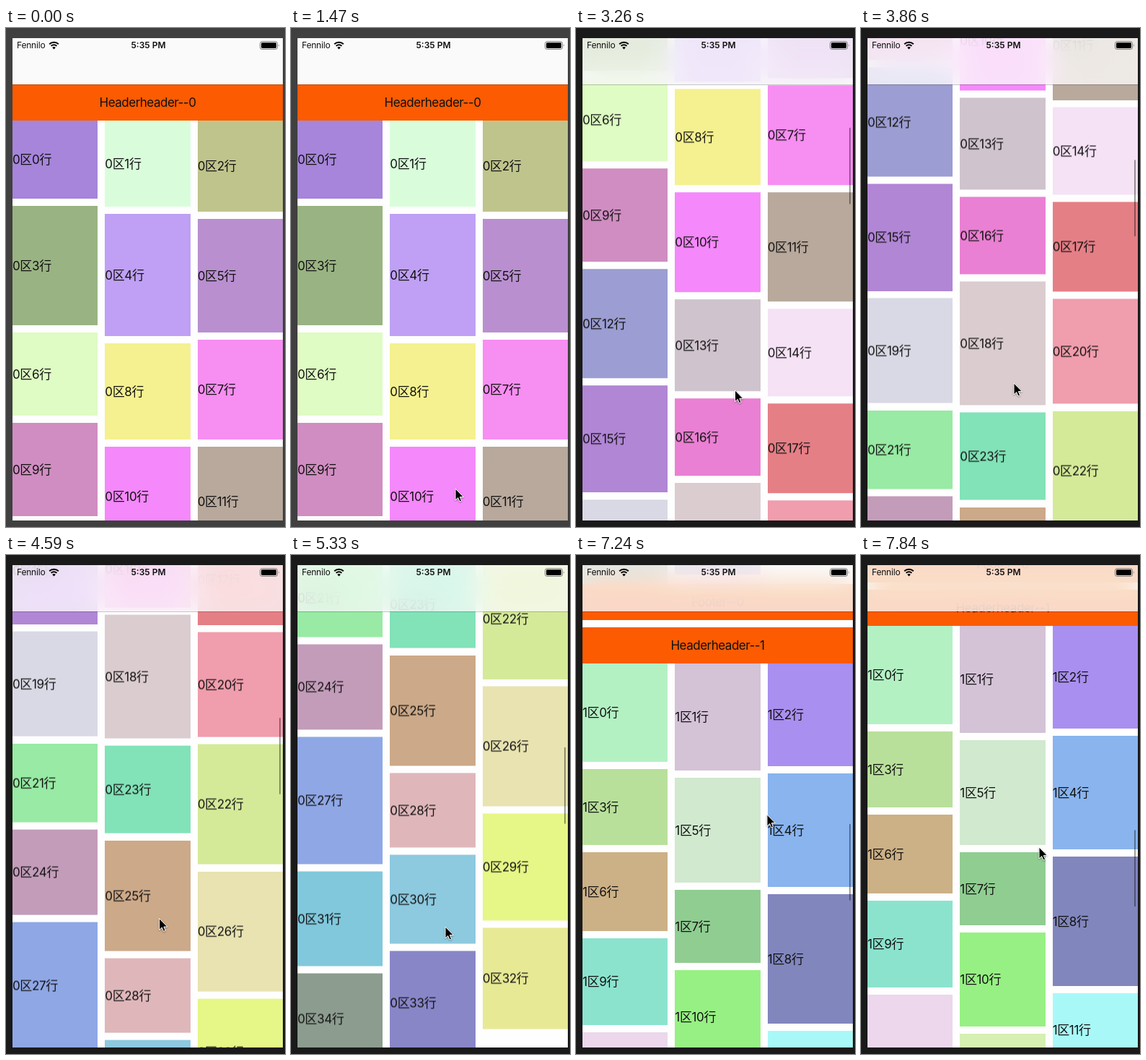
These frames come from a looping animation (387x690 px, 7990 ms). An HTML page:

```html
<!DOCTYPE html>
<html lang="zh-CN">
<head>
<meta charset="utf-8">
<title>Waterfall layout</title>
<style>
  html, body { margin: 0; width: 100%; height: 100%; overflow: hidden; }
  body {
    position: relative; background: #404040; color: #111;
    font: 17px/20px Inter, "Noto Sans CJK SC", "Noto Sans CJK", sans-serif;
  }
  body.active { background: #1a1a1a; }
  .phone {
    position: absolute; left: 9px; top: 14px; width: 375px; height: 667px;
    overflow: hidden; background: #fefefe;
  }
  .content { position: absolute; left: 0; top: 0; width: 100%; will-change: transform; }
  .cell, .band { position: absolute; display: flex; align-items: center; white-space: nowrap; }
  .cell { width: 118.33px; letter-spacing: -.35px; }
  .band {
    left: 0; width: 375px; height: 50px; justify-content: center;
    background: #fc5b01; letter-spacing: -.5px;
  }
  .bar {
    position: absolute; left: 0; top: 0; width: 375px; height: 64px;
    background: rgba(249, 249, 249, .8);
    backdrop-filter: blur(18px) saturate(1.6);
  }
  .line {
    position: absolute; left: 0; top: 63.5px; width: 375px; height: 1px;
    background: rgba(0, 0, 0, .22);
  }
  .status { position: absolute; top: 0; font-size: 12px; }
  .network { left: 6px; letter-spacing: -.2px; }
  .clock { left: 0; width: 377px; text-align: center; font-weight: 600; }
  .icons { position: absolute; left: 0; top: 0; }
  .thumb {
    position: absolute; left: 369.5px; top: 0; width: 2.5px; height: 106px;
    border-radius: 2px; background: rgba(0, 0, 0, .38);
  }
  .cursor {
    position: absolute; left: 0; top: 0; overflow: visible;
    filter: drop-shadow(0 1px 1px rgba(0, 0, 0, .35));
  }
</style>
</head>
<body>
<div class="phone">
  <div class="content"></div>
  <div class="bar"></div>
  <div class="line"></div>
  <div class="status network">Fennilo</div>
  <div class="status clock">5:35 PM</div>
  <svg class="icons" width="375" height="20">
    <g fill="none" stroke="#000" stroke-width="2">
      <path d="M51.2 8.2a9 9 0 0 1 12.6 0"/>
      <path d="M53.6 10.9a5.6 5.6 0 0 1 7.8 0"/>
    </g>
    <path d="M57.5 15.4l-2.3-2.4a3.3 3.3 0 0 1 4.6 0z"/>
    <rect x="343.5" y="4.8" width="24" height="10.6" rx="2.6" fill="none" stroke="#777"/>
    <rect x="345" y="6.3" width="21" height="7.6" rx="1.4"/>
    <path d="M369 8.3q1.6 1.8 0 3.6z" fill="#777"/>
  </svg>
  <div class="thumb"></div>
</div>
<svg class="cursor" width="13" height="20">
  <path d="M0 0V16L3.7 12.6L6 18L8.6 16.9L6.3 11.6H11.3Z" stroke="#fff" stroke-width="1"/>
</svg>
<script>
const LOOP = 7990, STEP = 147.9, LEAD = 10, WAKE = 17;
const TOP = 64, BAND = 50, GAP = 10, COL = 128.333;

// height:colour of each cell, per section
const sections = [
  `108:a685da 119:d9fddb 126:bfc48c 165:99b382 169:bfa0f4 157:b98fd0 115:defcc3
   138:f78ef2 133:f5f190 129:d08dc1 138:f588fb 151:b8a99c 151:9c9dd2 127:cfc3cd
   121:f5e2f5 148:b186d5 107:ea80d3 124:e57f86 171:dacccf 145:d9d9e5 145:f09dad
   109:98eaa4 166:d5ea99 121:82e2b8 118:c39cba 153:cca988 166:e8e3b1 176:8fa7e5
   103:dfb7ba 148:e6f687 123:8dc9df 131:81c8dc 140:e7e995 143:8986c8 125:8c9c8f`,
  `136:b3f1c3 148:d4c2d7 142:a98fef 105:b8e09b 157:89b4ee 145:d1e9cf 109:ccb086
   101:90cd91 179:8186bd 120:8be3ce 130:97f084 102:a9f8f8 170:ecd7ec 150:d6efb2`
];

// keys: [tick, value, ...]
const scrollKeys = [[16, 0], [17, 8], [18, 66], [26, 630.5], [36, 1154.5],
  [42, 1507], [49, 1818], [53, 1870]];
const cursorKeys = [[2, 234, 646], [5, 231, 623], [9, 230, 639], [12, 223, 631],
  [14, 223, 631], [15, 222, 630], [16, 222, 630], [17, 227, 586], [18, 229, 527.5],
  [26, 212, 491], [36, 214, 514], [42, 224, 460], [49, 265, 359], [53, 247, 404]];

const find = name => document.querySelector('.' + name);
const content = find('content'), thumb = find('thumb'), cursor = find('cursor');

function add(type, text, style) {
  const el = document.createElement('div');
  el.className = type;
  el.textContent = text;
  Object.assign(el.style, style);
  content.append(el);
}

// Each cell goes to the shortest column.
function build() {
  let y = TOP;
  sections.forEach((cells, s) => {
    add('band', `Headerheader--${s}`, { top: y + 'px' });
    const ends = Array(3).fill(y + BAND);
    cells.split(/\s+/).forEach((cell, row) => {
      const [height, color] = cell.split(':');
      const col = ends.indexOf(Math.min(...ends));
      const top = ends[col];
      add('cell', `${s}区${row}行`, {
        left: col * COL + 'px', top: top + 'px', height: height + 'px', background: '#' + color
      });
      ends[col] = top + Number(height) + GAP;
    });
    y = Math.max(...ends) - GAP;
    add('band', `Footer--${s}`, { top: y + 'px' });
    y += BAND + GAP;
  });
}

// Monotone cubic interpolation through the keys.
function sample(keys, t, i = 1) {
  const last = keys.length - 1;
  if (t <= keys[0][0]) return keys[0][i];
  if (t >= keys[last][0]) return keys[last][i];
  const n = keys.findIndex(k => k[0] > t) - 1;
  const slope = j => (keys[j + 1][i] - keys[j][i]) / (keys[j + 1][0] - keys[j][0]);
  const tangent = j => {
    if (j === 0 || j === last) return 0;
    const a = slope(j - 1), b = slope(j);
    return a * b > 0 ? 2 * a * b / (a + b) : 0;
  };
  const span = keys[n + 1][0] - keys[n][0], u = (t - keys[n][0]) / span, v = 1 - u;
  return v * v * (1 + 2 * u) * keys[n][i] + u * u * (3 - 2 * u) * keys[n + 1][i]
    + span * u * v * (v * tangent(n) - u * tangent(n + 1));
}

function draw(ms) {
  const tick = Math.min(53, Math.floor((ms % LOOP + LEAD) / STEP));
  const scroll = sample(scrollKeys, tick);
  const awake = tick >= WAKE;
  document.body.classList.toggle('active', awake);
  content.style.transform = `translateY(${-scroll}px)`;
  thumb.style.opacity = awake ? 1 : 0;
  thumb.style.transform = `translateY(${67.5 + scroll * .1597}px)`;
  cursor.style.opacity = tick >= 2 ? 1 : 0;
  cursor.style.transform =
    `translate(${sample(cursorKeys, tick, 1)}px, ${sample(cursorKeys, tick, 2)}px)`;
}

build();
const start = performance.now();
function loop() {
  draw(performance.now() - start);
  requestAnimationFrame(loop);
}
loop();
</script>
</body>
</html>
```
